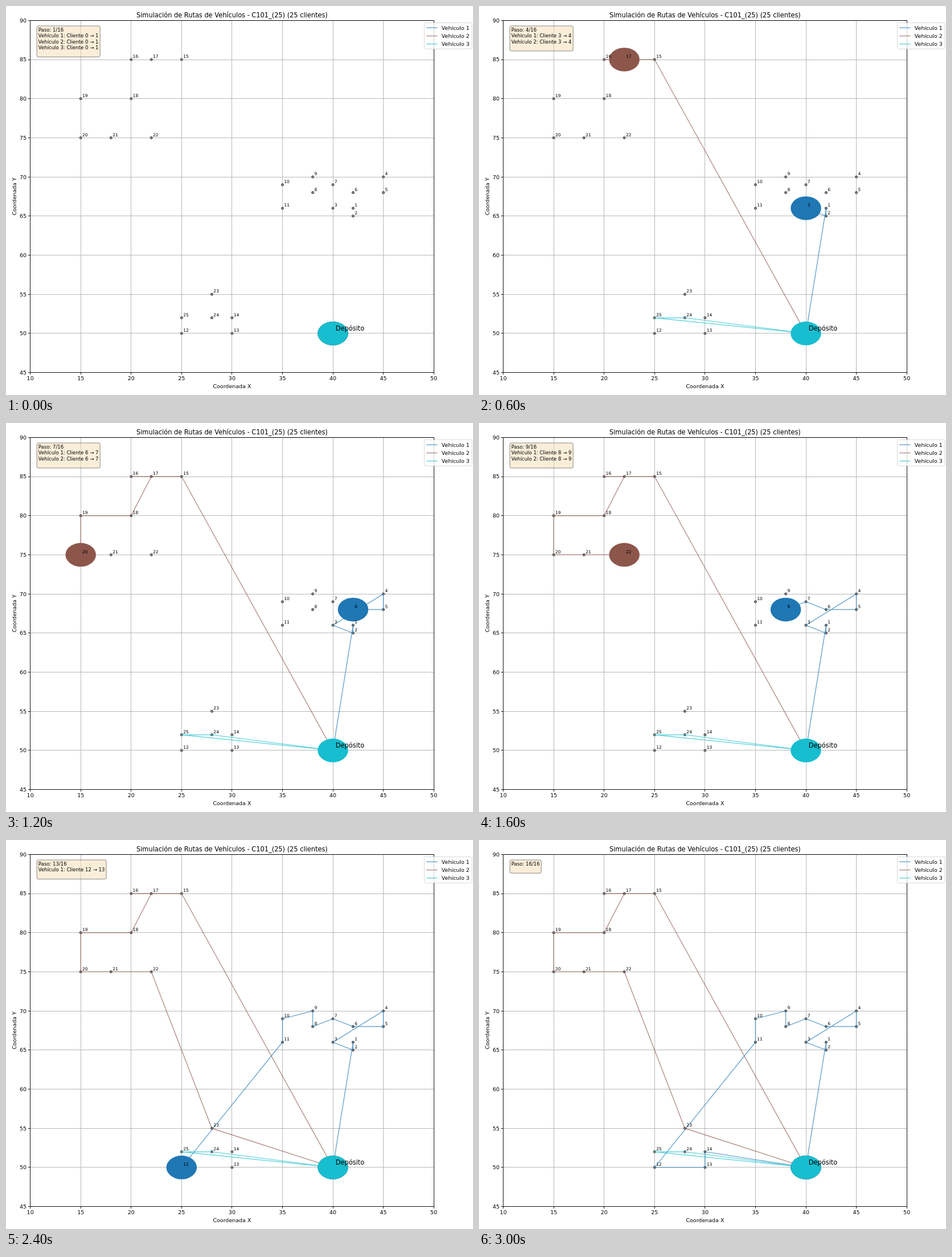
These frames come from a looping animation (820 by 683 pixels, 3200 ms). An HTML page with a canvas:

```html
<!DOCTYPE html>
<html lang="es">
<head>
<meta charset="utf-8">
<title>Simulación de Rutas de Vehículos</title>
<style>
html, body { margin: 0; width: 100%; height: 100%; overflow: hidden; background: #fff; }
canvas { display: block; }
</style>
</head>
<body>
<canvas id="plot" width="820" height="683"></canvas>
<script>
const ctx = document.getElementById('plot').getContext('2d');
const PT = 0.949; // pixels per typographic point
const STEP = 200, STEPS = 16;
const LEFT = 42.63, TOP = 25.3, UX = 17.713, UY = 13.74;
const px = v => LEFT + (v - 10) * UX;
const py = v => TOP + (90 - v) * UY;
const snap = v => Math.floor(v) + 0.5;
const X0 = snap(px(10)), X1 = snap(px(50)), Y0 = snap(py(90)), Y1 = snap(py(45));
const MID_X = px(30), MID_Y = py(67.5);

// Index 0 is the depot, the rest are clients.
const nodes = [
  [40, 50], [42, 66], [42, 65], [40, 66], [45, 70], [45, 68], [42, 68],
  [40, 69], [38, 68], [38, 70], [35, 69], [35, 66], [25, 50], [30, 50],
  [30, 52], [25, 85], [20, 85], [22, 85], [20, 80], [15, 80], [15, 75],
  [18, 75], [22, 75], [28, 55], [28, 52], [25, 52]
].map(([x, y]) => [px(x), py(y)]);

const range = (a, b) => Array.from({ length: b - a + 1 }, (_, i) => a + i);
const vehicles = [
  { color: '#1f77b4', route: [0, ...range(1, 14), 0] },
  { color: '#8c564b', route: [0, ...range(15, 23), 0] },
  { color: '#17becf', route: [0, 24, 25, 0] }
];
const TRAIL_ALPHA = 0.65, TRAIL_WIDTH = 1.42;

function setFont(pt) {
  ctx.font = `${pt * PT}px "DejaVu Sans", Verdana, sans-serif`;
}

function label(str, x, y, pt, align = 'left') {
  setFont(pt);
  ctx.textAlign = align;
  ctx.fillStyle = '#000';
  ctx.fillText(str, x, y);
}

function line(points, color, width, alpha = 1) {
  ctx.globalAlpha = alpha;
  ctx.strokeStyle = color;
  ctx.lineWidth = width;
  ctx.beginPath();
  points.forEach(([x, y]) => ctx.lineTo(x, y));
  ctx.stroke();
  ctx.globalAlpha = 1;
}

function panel(x, y, w, h, r, fill, edge) {
  ctx.beginPath();
  ctx.roundRect(x, y, w, h, r);
  ctx.fillStyle = fill;
  ctx.fill();
  ctx.strokeStyle = edge;
  ctx.lineWidth = 0.9;
  ctx.stroke();
}

function drawGrid() {
  for (let v = 10; v <= 50; v += 5) {
    const x = snap(px(v));
    line([[x, Y0], [x, Y1]], '#b0b0b0', 0.9);
  }
  for (let v = 45; v <= 90; v += 5) {
    const y = snap(py(v));
    line([[X0, y], [X1, y]], '#b0b0b0', 0.9);
  }
}

function drawClients() {
  ctx.lineWidth = 0.9;
  ctx.fillStyle = '#808080';
  ctx.strokeStyle = '#404040';
  nodes.slice(1).forEach(([x, y]) => {
    ctx.beginPath();
    ctx.arc(x, y, 2.1, 0, Math.PI * 2);
    ctx.fill();
    ctx.stroke();
  });
}

function drawVehicles(step) {
  const [dx, dy] = nodes[0];
  vehicles.forEach(({ color, route }) => {
    const trail = route.slice(0, step + 1).map(i => nodes[i]);
    if (trail.length > 1) line(trail, color, TRAIL_WIDTH, TRAIL_ALPHA);
  });
  ctx.fillStyle = '#000';
  ctx.fillRect(dx - 4.5, dy - 4.5, 9, 9);
  vehicles.forEach(({ color, route }) => {
    const [x, y] = nodes[route[Math.min(step, route.length - 1)]];
    ctx.fillStyle = color;
    ctx.beginPath();
    ctx.ellipse(x, y, 1.5 * UX + 0.2, 1.5 * UY + 0.2, 0, 0, Math.PI * 2);
    ctx.fill();
  });
}

function drawAxes() {
  line([[X0, Y0], [X1, Y0], [X1, Y1], [X0, Y1], [X0, Y0], [X1, Y0]], '#000', 0.9);
  for (let v = 10; v <= 50; v += 5) {
    const x = snap(px(v));
    line([[x, Y1], [x, Y1 + 3.6]], '#000', 0.9);
    label(v, px(v), 657.2, 10, 'center');
  }
  for (let v = 45; v <= 90; v += 5) {
    const y = snap(py(v));
    line([[X0 - 3.6, y], [X0, y]], '#000', 0.9);
    label(v, LEFT - 7 * PT, py(v) + 3.45, 10, 'right');
  }
  label('Coordenada X', MID_X, 671, 10, 'center');
  ctx.save();
  ctx.translate(18, MID_Y);
  ctx.rotate(-Math.PI / 2);
  label('Coordenada Y', 0, 0, 10, 'center');
  ctx.restore();
  label('Simulación de Rutas de Vehículos - C101_(25) (25 clientes)', MID_X, TOP - 6 * PT, 12, 'center');
}

function drawLabels() {
  nodes.forEach(([x, y], i) => {
    if (i) label(i, x + 3 * PT, y - 3 * PT, 8);
    else label('Depósito', x + 5 * PT, y - 5 * PT, 12);
  });
}

function drawInfo(step) {
  const rows = [`Paso: ${step + 1}/${STEPS}`];
  vehicles.forEach(({ route }, i) => {
    if (step < route.length - 1) rows.push(`Vehículo ${i + 1}: Cliente ${step} → ${step + 1}`);
  });
  setFont(9);
  const width = Math.max(...rows.map(r => ctx.measureText(r).width));
  const top = 35, bottom = 58.2 + 10.4 * (rows.length - 1);
  panel(54.2, top, width + 5.3, bottom - top, 2.6, 'rgba(245,222,179,0.5)', 'rgba(0,0,0,0.5)');
  rows.forEach((r, i) => label(r, 56.8, 45.2 + i * 10.2, 9));
}

function drawLegend() {
  panel(734.5, 29.5, 83.5, 45.8, 2, 'rgba(255,255,255,0.8)', 'rgba(204,204,204,0.8)');
  vehicles.forEach(({ color }, i) => {
    const y = 38.3 + i * 14.25;
    line([[738.2, y], [757.4, y]], color, TRAIL_WIDTH, TRAIL_ALPHA);
    label(`Vehículo ${i + 1}`, 764.8, y + 3.3, 10);
  });
}

function draw(step) {
  ctx.fillStyle = '#fff';
  ctx.fillRect(0, 0, 820, 683);
  ctx.lineJoin = 'round';
  drawGrid();
  drawClients();
  drawVehicles(step);
  drawAxes();
  drawLabels();
  drawInfo(step);
  drawLegend();
}

const start = performance.now();
let shown = -1;
function tick() {
  const step = Math.floor((performance.now() - start) / STEP) % STEPS;
  if (step !== shown) draw(shown = step);
  requestAnimationFrame(tick);
}
tick();
</script>
</body>
</html>
```
